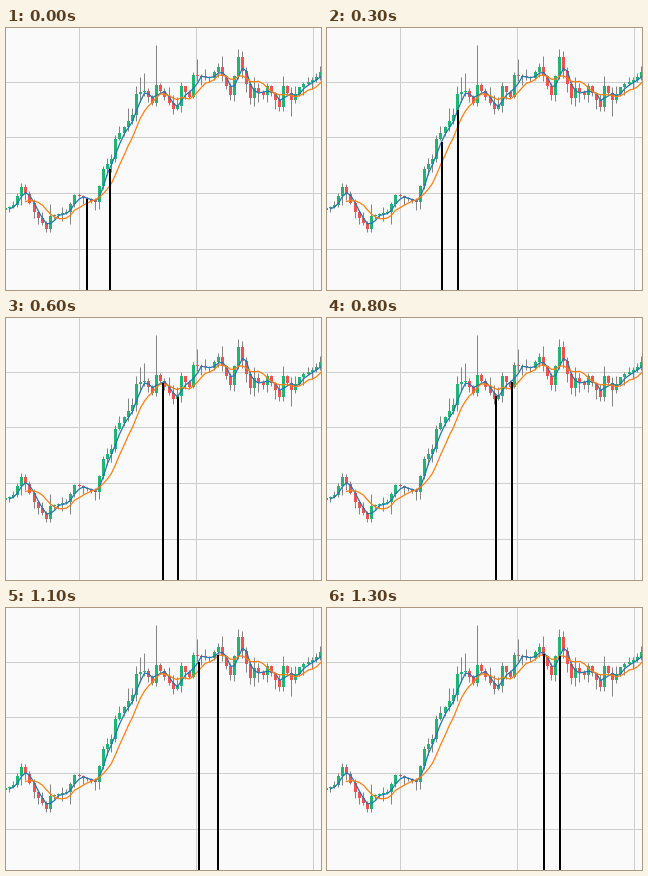
Animation of 315x262 px, one loop 1.4 s. Source, as a matplotlib script:

```python
import numpy as np
import matplotlib.pyplot as plt
from matplotlib.animation import FuncAnimation
from matplotlib.patches import Rectangle

W, H, DPI = 315, 262, 100
PX = 72 / DPI
STEPS, STEP_MS = 14, 100
GREEN, RED, WICK = "#21b573", "#f2514e", "#858585"

# Turning points of the price: (candle, pixels from the top)
TURNS = [
    (-2, 182), (1, 177), (3, 159), (4, 166), (6, 184), (9, 201), (10, 188),
    (14, 184), (16, 167), (21, 174), (23, 141), (25, 131), (26, 111),
    (30, 87), (31, 66), (33, 63), (35, 75), (36, 57), (40, 81), (41, 78),
    (42, 58), (44, 69), (45, 47), (49, 50), (51, 39), (54, 67), (56, 29),
    (59, 70), (60, 60), (62, 67), (63, 58), (66, 79), (67, 58), (69, 72),
    (71, 59), (75, 49), (77, 40),
]
SPIKES = {32: 15, 33: 18, 36: 40, 46: 16}  # tall upper wicks

# Key poses of the walking legs
KEY_TIMES = [0, 300, 600, 800, 1000, 1200, 1300]
LEFT_X = [81, 115, 157, 169, 183, 203, 217]
RIGHT_X = [104, 131, 172, 185, 198, 225, 233]

candles = np.arange(TURNS[0][0], TURNS[-1][0] + 1)
candle_x = np.round(3 + 4.09 * candles)
closes = np.interp(candles, *np.transpose(TURNS))

fig = plt.figure(figsize=(W / DPI, H / DPI), dpi=DPI, facecolor="#fafafa")
ax = fig.add_axes([0, 0, 1, 1])
ax.set_xlim(0, W)
ax.set_ylim(H, 0)
ax.axis("off")


def draw_grid():
    style = dict(color="#cecece", lw=PX, zorder=0)
    for x in (73, 190, 307):
        ax.plot([x, x], [0, H], **style)
    for y in (54, 109, 165, 221):
        ax.plot([0, W], [y, y], **style)


def draw_candles():
    rng = np.random.default_rng(4)
    opens = np.append(closes[0], closes[:-1])
    for i, x, start, end in zip(candles, candle_x, opens, closes):
        top, bottom = np.round(sorted((start, end)))
        up, down = rng.gamma(2, 2, 2)
        ax.plot([x, x], [top - SPIKES.get(i, up), bottom + down],
                color=WICK, lw=PX, solid_capstyle="butt", zorder=1)
        ax.add_patch(Rectangle((x - 1, top), 3, max(1, bottom - top),
                               color=GREEN if end < start else RED,
                               lw=0, zorder=2))


def moving_average(span):
    mean = np.convolve(closes, np.ones(span) / span, "valid")
    return candle_x[span - 1:] + 0.5, mean + 0.5


draw_grid()
draw_candles()
fast, slow = moving_average(3), moving_average(7)
for line, color in ((fast, "#1f77b4"), (slow, "#ff7f0e")):
    ax.plot(*line, color=color, lw=1.25 * PX, zorder=3)
legs = [ax.add_patch(Rectangle((0, 0), 2, 0, color="black", lw=0, zorder=4))
        for _ in range(2)]


def update(step):
    # Each leg stands just below the fast average.
    for leg, xs in zip(legs, (LEFT_X, RIGHT_X)):
        x = np.interp(step * STEP_MS, KEY_TIMES, xs)
        top = round(np.interp(x, *fast) + 1)
        leg.set_bounds(round(x) - 1, top, 2, H - top)
    return legs


anim = FuncAnimation(fig, update, frames=STEPS, interval=STEP_MS,
                     init_func=lambda: update(0), repeat=True, repeat_delay=0)
plt.show()
```
